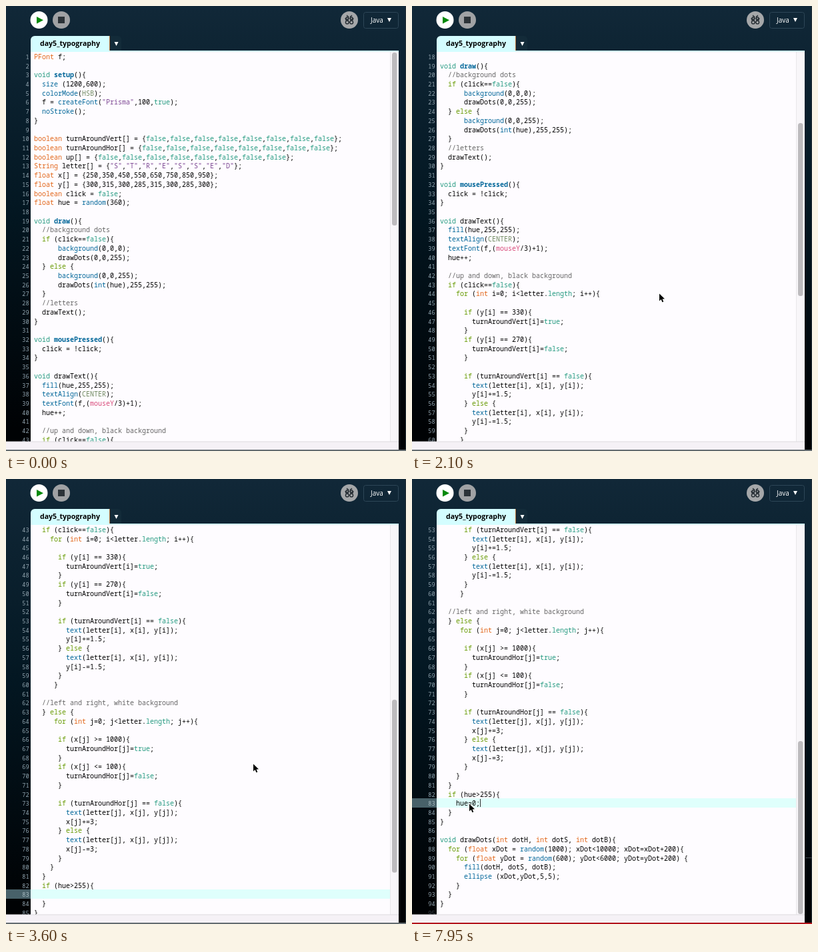
An HTML page with a canvas for the animation above (8000 ms loop, 600 by 669 pixels).

```html
<!DOCTYPE html>
<html lang="en">
<head>
<meta charset="utf-8">
<style>
html, body { margin: 0; width: 100%; height: 100%; overflow: hidden; background: #000; }
canvas { display: block; }
</style>
</head>
<body>
<canvas id="stage" width="600" height="669"></canvas>
<script>
const ctx = document.getElementById('stage').getContext('2d');
const LOOP = 8000, PITCH = 13.714, CHAR = 6, TEXT_X = 42, EDIT_LINE = 83;
const MONO = '"Noto Sans Mono", "DejaVu Sans Mono", monospace';
const SANS = '"Open Sans", "Noto Sans", sans-serif';

const code = `PFont f;

void setup(){
  size (1200,600);
  colorMode(HSB);
  f = createFont("Prisma",100,true);
  noStroke();
}

boolean turnAroundVert[] = {false,false,false,false,false,false,false,false};
boolean turnAroundHor[] = {false,false,false,false,false,false,false,false};
boolean up[] = {false,false,false,false,false,false,false,false};
String letter[] = {"S","T","R","E","S","S","E","D"};
float x[] = {250,350,450,550,650,750,850,950};
float y[] = {300,315,300,285,315,300,285,300};
boolean click = false;
float hue = random(360);

void draw(){
  //background dots
  if (click==false){
      background(0,0,0);
      drawDots(0,0,255);
  } else {
      background(0,0,255);
      drawDots(int(hue),255,255);
  }
  //letters
  drawText();
}

void mousePressed(){
  click = !click;
}

void drawText(){
  fill(hue,255,255);
  textAlign(CENTER);
  textFont(f,(mouseY/3)+1);
  hue++;

  //up and down, black background
  if (click==false){
    for (int i=0; i<letter.length; i++){

      if (y[i] == 330){
        turnAroundVert[i]=true;
      }
      if (y[i] == 270){
        turnAroundVert[i]=false;
      }

      if (turnAroundVert[i] == false){
        text(letter[i], x[i], y[i]);
        y[i]+=1.5;
      } else {
        text(letter[i], x[i], y[i]);
        y[i]-=1.5;
      }
     }

  //left and right, white background
  } else {
     for (int j=0; j<letter.length; j++){

      if (x[j] >= 1000){
        turnAroundHor[j]=true;
      }
      if (x[j] <= 100){
        turnAroundHor[j]=false;
      }

      if (turnAroundHor[j] == false){
        text(letter[j], x[j], y[j]);
        x[j]+=3;
      } else {
        text(letter[j], x[j], y[j]);
        x[j]-=3;
      }
    }
  }
  if (hue>255){

  }
}

void drawDots(int dotH, int dotS, int dotB){
  for (float xDot = random(1000); xDot<10000; xDot=xDot+200){
    for (float yDot = random(600); yDot<6000; yDot=yDot+200) {
      fill(dotH, dotS, dotB);
      ellipse (xDot,yDot,5,5);
    }
  }
}`.split('\n');

// First matching rule gives a token its colour (and weight).
const rules = [
  [/^\/\//, '#666666'],
  [/^"/, '#7d4793'],
  [/^int\($/, '#006699'],
  [/^(PFont|boolean|String|float|int)$/, '#e2661a'],
  [/^(void|true|false|length)$/, '#249a80'],
  [/^(if|else|for)$/, '#669900'],
  [/^(setup|draw|mousePressed)$/, '#006699', 'bold '],
  [/^(size|colorMode|createFont|noStroke|random|background|fill|textAlign|textFont|text|ellipse)$/, '#006699'],
  [/^(HSB|CENTER)$/, '#718a62'],
  [/^mouseY$/, '#d94a7a'],
];

function tokenize(line) {
  return [...line.matchAll(/\/\/.*|"[^"]*"|\w+|[^\w\s"]+/g)].map(({ 0: text, index }) => {
    const key = text === 'int' && line[index + 3] === '(' ? 'int(' : text;
    const [, color = '#000', weight = ''] = rules.find(([test]) => test.test(key)) || [];
    return { text, x: TEXT_X + index * CHAR, color, weight };
  });
}
const lines = code.map(tokenize);

const scrollKeys = [[1350, 0], [1650, 7], [2500, 27], [3400, 38], [3600, 42], [4000, 52]];
const keystrokes = [6050, 6250, 6500, 6900, 7200, 7500];
const TYPED = 'hue=0;', CLICK_TIME = 5200;

function track(keys, t) {
  if (t <= keys[0][0]) return keys[0][1];
  for (let i = 1; i < keys.length; i++) {
    const [t0, v0] = keys[i - 1], [t1, v1] = keys[i];
    if (t <= t1) return v0 + (v1 - v0) * (t - t0) / (t1 - t0);
  }
  return keys[keys.length - 1][1];
}

function rect(x, y, w, h, color) {
  ctx.fillStyle = color;
  ctx.fillRect(x, y, w, h);
}
function round(x, y, w, h, r, color) {
  ctx.fillStyle = color;
  ctx.beginPath();
  ctx.roundRect(x, y, w, h, r);
  ctx.fill();
}
function polygon(points, color) {
  ctx.fillStyle = color;
  ctx.beginPath();
  points.forEach(([x, y]) => ctx.lineTo(x, y));
  ctx.closePath();
  ctx.fill();
}
function disc(x, y, r, color) {
  ctx.fillStyle = color;
  ctx.beginPath();
  ctx.arc(x, y, r, 0, Math.PI * 2);
  ctx.fill();
}
function label(text, x, y, font, color, align = 'left') {
  ctx.font = font;
  ctx.fillStyle = color;
  ctx.textAlign = align;
  ctx.fillText(text, x, y);
}
const downArrow = (x, y) => polygon([[x - 3, y - 3], [x + 3, y - 3], [x, y + 3]], '#fff');

function debugIcon(x, y) {
  disc(x, y, 13, '#a5a7a9');
  ctx.strokeStyle = '#222a30';
  ctx.lineWidth = 1.4;
  for (const side of [-1, 1]) {
    ctx.beginPath();
    ctx.moveTo(x + side, y - 1);
    ctx.lineTo(x + side * 1.5, y - 5);
    ctx.lineTo(x + side * 4, y - 7);
    ctx.moveTo(x + side * 6, y - 3);
    ctx.lineTo(x + side * 5, y);
    ctx.lineTo(x + side, y);
    ctx.stroke();
    for (const [dy, r] of [[-2.5, 1.7], [3.5, 2.4]]) {
      ctx.beginPath();
      ctx.arc(x + side * 3.2, y + dy, r, 0, Math.PI * 2);
      ctx.stroke();
    }
  }
}

function drawHeader() {
  const shade = ctx.createLinearGradient(0, 0, 0, 669);
  shade.addColorStop(0, '#112838');
  shade.addColorStop(0.45, '#031722');
  shade.addColorStop(0.95, '#000204');
  rect(0, 0, 600, 669, shade);

  disc(49.5, 21, 13, '#fff');
  polygon([[46, 16], [56, 21.2], [46, 26.5]], '#068a0c');
  disc(83, 21, 13, '#a0a2a4');
  rect(78, 16, 10, 10, '#2c3338');
  debugIcon(515, 21);

  ctx.strokeStyle = '#2d4657';
  ctx.lineWidth = 1;
  ctx.beginPath();
  ctx.roundRect(536.5, 9.5, 52, 24, 3);
  ctx.stroke();
  label('Java', 547, 24.5, `10px ${SANS}`, '#fff');
  downArrow(575, 21);

  round(37, 45, 118, 24, [6, 0, 0, 0], '#d4fdff');
  rect(155, 45, 1, 23, '#b5713a');
  round(157, 45, 16, 23, [0, 5, 0, 0], '#132b39');
  downArrow(165.5, 57);
  label('day5_typography', 96, 60, `bold 10.6px ${SANS}`, '#000', 'center');
}

function drawEditor(t) {
  const top = Math.floor(track(scrollKeys, t) + 1e-6);
  const typed = keystrokes.filter(k => t >= k).length;

  rect(37, 68, 552, 587, '#fefcff');
  rect(37, 67, 552, 2, '#d4fdff');

  ctx.save();
  ctx.beginPath();
  ctx.rect(0, 69, 576, 586);
  ctx.clip();
  for (let row = 0; row < 43; row++) {
    const number = top + row + 1;
    const y = 69.5 + row * PITCH, baseline = y + 10.3;
    const active = number === EDIT_LINE;
    if (active) {
      rect(0, Math.round(y - 1), 37, 14, '#486169');
      rect(37, Math.round(y - 1), 539, 14, '#dffffc');
    }
    const numberColor = number > lines.length ? '#3a434a' : active ? '#a9bcc3' : '#93a5b0';
    label(number, 34.5, baseline, `8.5px ${MONO}`, numberColor, 'right');
    for (const token of lines[number - 1] || [])
      label(token.text, token.x, baseline, `${token.weight}10px ${MONO}`, token.color);
    if (active) {
      const x = TEXT_X + 4 * CHAR;
      label(TYPED.slice(0, typed), x, baseline, `10px ${MONO}`, '#000');
      const lastInput = typed ? keystrokes[typed - 1] : CLICK_TIME;
      if (t >= CLICK_TIME && (t - lastInput) % 1000 < 500)
        rect(x + typed * CHAR, Math.round(y), 1, 12, '#333');
    }
  }
  ctx.restore();

  rect(576, 69, 13, 586, '#f8f6f9');
  rect(576, 69, 1, 586, '#e9e7ea');
  round(579, 70 + top * 6.23, 7.5, 260, 3.5, '#bdbbbe');
}

function drawFooter(t) {
  rect(0, 655, 589, 12, '#f5f1f6');
  rect(0, 654.5, 589, 1, '#dedbe0');
  rect(0, 667, 600, 2, '#646c70');
  rect(599, 0, 1, 667, '#252f35');
  if (t >= 7900) {
    rect(0, 667, 600, 2, '#b3141c');
    rect(590, 569, 10, 1, '#3b4348');
  }
}

function drawPointer(t) {
  if (t < 1300) return;
  const p = Math.min(1, Math.max(0, (t - 4250) / 750));
  const ease = p * p * (3 - 2 * p);
  const startY = t < 3000 ? 432.5 : 428.5;
  ctx.save();
  ctx.translate(371 - 285 * ease, startY + (488.5 - startY) * ease);
  ctx.beginPath();
  [[0, 0], [0, 11], [2.6, 8.6], [4.4, 12.8], [6.3, 12], [4.5, 7.9], [8, 7.8]]
    .forEach(([x, y]) => ctx.lineTo(x, y));
  ctx.closePath();
  ctx.lineWidth = 1.6;
  ctx.strokeStyle = '#fff';
  ctx.stroke();
  ctx.fillStyle = '#000';
  ctx.fill();
  ctx.restore();
}

function frame() {
  const t = Math.floor(performance.now() % LOOP / 50) * 50;
  drawHeader();
  drawEditor(t);
  drawFooter(t);
  drawPointer(t);
  requestAnimationFrame(frame);
}
frame();
</script>
</body>
</html>
```
